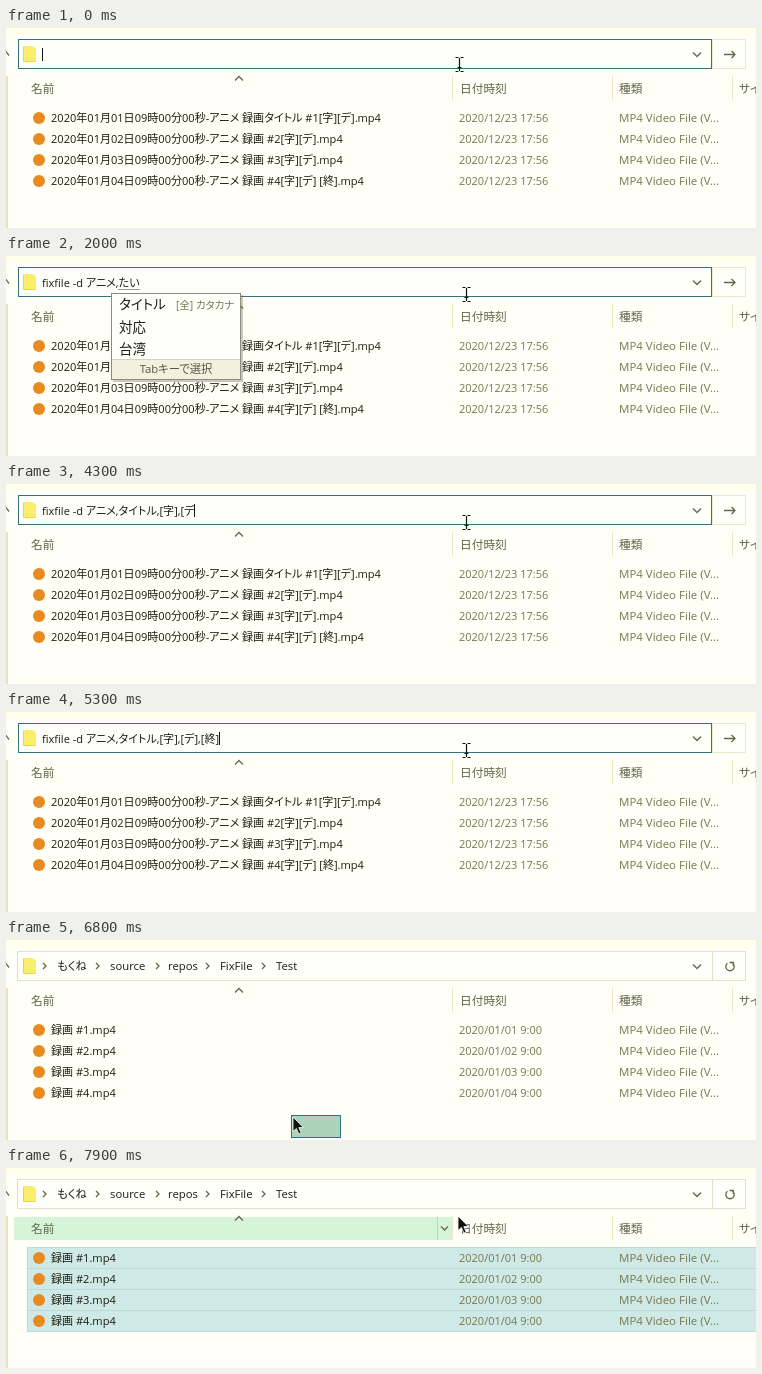
Animation, 750 px wide and 200 px high, one loop 8 s. Source, as an HTML page:

```html
<!DOCTYPE html>
<html lang="ja">
<head>
<meta charset="utf-8">
<title>Batch rename from the address bar</title>
<style>
html, body { margin: 0; width: 100%; height: 100%; overflow: hidden; background: #fffff7; }
svg { display: block; width: 750px; height: 200px; }
text {
  font: 11.3px "Open Sans", "Noto Sans CJK JP", "Noto Sans CJK", sans-serif;
  font-feature-settings: "palt";
  white-space: pre;
  fill: #1c1c10;
}
.dim { fill: #77774f; }
.date { font-size: 11px; }
.kind { font-size: 11.5px; }
.name, .cmd { font-size: 11.05px; }
.head { font-size: 11.7px; fill: #5d6648; }
.cand { font-size: 13.5px; }
.note { font-size: 10.4px; }
.line { fill: none; stroke: #66664c; stroke-width: 1.3; }
.rule { fill: none; stroke: #e8e8c4; }
</style>
</head>
<body>
<svg id="stage" viewBox="0 0 750 200">
  <rect width="750" height="200" fill="#fffff7"/>
  <rect width="750" height="6" fill="#ffffea"/>
  <rect y="48" width="2" height="152" fill="#e6e3b8"/>
  <path class="line" d="M-3 27.5L0 23.5L3 27.5"/>

  <g id="header">
    <g id="hover">
      <rect x="8" y="49" width="439" height="23" fill="#d6f4d8"/>
      <path d="M431.5 49V72" stroke="#b4dcbc"/>
      <path class="line" d="M435 58.5L438.5 62L442 58.5"/>
    </g>
    <path class="rule" d="M446.5 48V72M606.5 48V72M726.5 48V72"/>
    <path class="line" d="M229 52.5L233 48.5L237 52.5"/>
  </g>
  <g id="rows"></g>

  <g id="crumbs">
    <rect x="11.5" y="11.5" width="728" height="29" fill="#fffffa" stroke="#e0e0cc"/>
    <path d="M706.5 12V40" stroke="#e0e0cc"/>
    <path class="line" d="M687 24.5L691 28.5L695 24.5" stroke-width="1.5"/>
    <path class="line" d="M721.5 23.2A4.2 4.2 0 1 0 726.5 23.2M723.5 22.5H727.3V26"/>
  </g>
  <g id="editor">
    <rect x="706.5" y="11.5" width="33" height="29" fill="#fffffa" stroke="#e8e8cc"/>
    <path class="line" d="M718 26.5H729M725.5 23L729 26.5L725.5 30"/>
    <rect x="12.5" y="11.5" width="693" height="29" fill="#fffffa" stroke="#34717a"/>
    <path class="line" d="M687 24.5L691 28.5L695 24.5"/>
    <text id="cmd" class="cmd" x="36" y="31"></text>
    <path id="under" stroke="#333" stroke-dasharray="1 1"/>
    <path id="caret" stroke="#111"/>
  </g>
  <path d="M17 18H26L30 20V34H17Z" fill="#faee6c"/>
  <path d="M17.5 19V33.5H29.5" fill="none" stroke="#e6d648"/>

  <g id="suggest">
    <rect x="39" y="38" width="638" height="54" fill="#55554a" opacity=".3"/>
    <rect x="38" y="37" width="637" height="54" fill="#55554a" opacity=".5"/>
    <rect x="36.5" y="34.5" width="636" height="54" fill="#fffffa" stroke="#5c5c4c"/>
    <text x="42" y="48">fixfile</text>
    <text id="search" x="42" y="67"></text>
    <path d="M669 80V87M666 83V87M663 86V87" stroke="#999988" stroke-width="1.5" stroke-dasharray="1.5 1.5"/>
  </g>

  <g id="ime">
    <rect x="107" y="39" width="130" height="87" fill="#66665a" opacity=".35"/>
    <rect x="105.5" y="37.5" width="129" height="86" fill="#fffffa" stroke="#8c8c7c"/>
    <rect x="106" y="103" width="128" height="20" fill="#f1f1de"/>
    <path d="M106 103.5H234" stroke="#d2d2c0"/>
    <text class="cand" x="113" y="53">タイトル</text>
    <text class="dim note" x="170" y="52.5">[全] カタカナ</text>
    <text class="cand" x="113" y="76">対応</text>
    <text class="cand" x="113" y="97.5">台湾</text>
    <text x="170" y="117" text-anchor="middle" style="fill:#55554a">Tabキーで選択</text>
  </g>

  <rect id="band" fill="#8fc4a4" fill-opacity=".75" stroke="#2f7486"/>
  <path id="beam" d="M-4 -6.5H-1M1 -6.5H4M-4 7.5H-1M1 7.5H4M-2 3.5H2M0 -6V7" fill="none" stroke="#111" stroke-width="1.2"/>
  <path id="arrow" d="M0 0V14.5L3.4 11.4L5.8 17L8.2 16L5.8 10.6H10.4Z" fill="#111" stroke="#fffffb" stroke-width=".8"/>
</svg>
<script>
const LOOP = 8000, STEP = 100;
const ENTER = 5500, RENAME = 5900, DRAG = 6500, DROP = 7400, HOVER = 7700;
const $ = id => document.getElementById(id);

function add(parent, tag, attrs, content = '') {
  const el = document.createElementNS('http://www.w3.org/2000/svg', tag);
  for (const key in attrs) el.setAttribute(key, attrs[key]);
  el.textContent = content;
  return parent.appendChild(el);
}
const label = (parent, x, y, content, cls = '') => add(parent, 'text', { x, y, class: cls }, content);
const show = (id, on) => $(id).setAttribute('visibility', on ? 'visible' : 'hidden');

[[25, '名前'], [454, '日付時刻'], [613, '種類'], [733, 'サイズ']]
  .forEach(([x, title]) => label($('header'), x, 64.5, title, 'head'));

[[51, 'もくね'], [104, 'source'], [162, 'repos'], [214, 'FixFile'], [270, 'Test']]
  .forEach(([x, name]) => label($('crumbs'), x, 30, name));
[39, 92, 152, 202, 258].forEach(x =>
  add($('crumbs'), 'path', { class: 'line', d: `M${x - 2} 23L${x + 1} 26L${x - 2} 29` }));

const rows = [1, 2, 3, 4].map(n => {
  const y = 69 + 21 * n, g = $('rows');
  const mark = add(g, 'rect', { x: 21.5, y: y - 10.5, width: 740, height: 21, fill: '#cfeae6', stroke: '#b8dcd8' });
  add(g, 'circle', { cx: 33, cy: y, r: 6, fill: '#e88a20' });
  const name = label(g, 45, y + 4, '', 'name');
  const date = label(g, 453, y + 4, '', 'dim date');
  label(g, 613, y + 4, 'MP4 Video File (V...', 'dim kind');
  const title = n === 1 ? 'タイトル' : '', last = n === 4 ? ' [終]' : '';
  return {
    y, mark, name, date,
    before: [`2020年01月0${n}日09時00分00秒-アニメ 録画${title} #${n}[字][デ]${last}.mp4`, '2020/12/23 17:56'],
    after: [`録画 #${n}.mp4`, `2020/01/0${n} 9:00`]
  };
});

// [start, committed text, text still being composed]
const typing = [[0, '', '']];
let typed = '';
function compose(...stages) {
  for (const [at, text] of stages) typing.push([at, typed, text]);
}
function commit(at, text) {
  typed += text;
  typing.push([at, typed, '']);
}
[...'fixfile -d '].forEach((c, i) => commit(100 + 100 * i, c));
compose([1200, 'あ'], [1300, 'あに'], [1400, 'あにめ'], [1500, 'アニメ']);
commit(1600, 'アニメ');
commit(1700, ',');
compose([1800, 't'], [1900, 'た'], [2000, 'たい'], [2300, 'タイトル']);
commit(2500, 'タイトル');
commit(2700, ',');
commit(2900, '[');
compose([3000, 'じ'], [3100, '字']);
commit(3200, '字');
commit(3300, ']');
commit(3700, ',');
commit(3900, '[');
compose([4000, 'で'], [4200, 'デ']);
commit(4300, 'デ');
commit(4400, ']');
commit(4600, ',');
commit(4700, '[');
compose([4800, 'しゅう'], [5000, '終']);
commit(5100, '終');
commit(5200, ']');

// [time, x, y]
const pointer = [
  [0, 453, 36], [100, 453, 36], [1500, 460, 38], [5700, 460, 38], [6400, 335, 198],
  [6500, 335, 198], [6800, 287, 177], [7200, 215, 84], [7400, 212, 82], [7900, 452, 48], [8000, 452, 48]
];
function pointerAt(t) {
  const i = pointer.findIndex(p => p[0] > t);
  const [t0, x0, y0] = pointer[i - 1], [t1, x1, y1] = pointer[i];
  const u = (t - t0) / (t1 - t0), k = u * u * (3 - 2 * u);
  return [x0 + (x1 - x0) * k, y0 + (y1 - y0) * k].map(Math.round);
}

function drawEditor(t) {
  const editing = t < ENTER;
  const [, done, pending] = typing.filter(s => s[0] <= t).pop();
  const cmd = $('cmd');
  const endOf = text => {
    cmd.textContent = text;
    return 36 + (text ? cmd.getComputedTextLength() : 0);
  };
  const from = endOf(done), to = endOf(done + pending);
  $('under').setAttribute('d', `M${from} 33.5H${to}`);
  $('caret').setAttribute('d', `M${Math.round(to) + .5} 20V33`);
  show('editor', editing);
  show('crumbs', !editing);
  show('under', editing && pending);
  show('caret', editing && !pending);
  $('search').textContent = `"${done.trim()}" の検索`;
  show('suggest', t >= 300 && t < 1200);
  show('ime', t >= 1900 && t < 2500);
}

function drawPointer(t) {
  const [x, y] = pointerAt(t);
  const hidden = t >= 100 && t < 1500, inBar = t <= 5700;
  $('beam').setAttribute('transform', `translate(${x + .5} ${y})`);
  $('arrow').setAttribute('transform', `translate(${x} ${y})`);
  show('beam', inBar && !hidden);
  show('arrow', !inBar);
  const left = x - 1.5, top = y - 1.5;
  const box = { x: left, y: top, width: Math.max(0, 334.5 - left), height: Math.max(0, 197.5 - top) };
  for (const key in box) $('band').setAttribute(key, box[key]);
  show('band', t > DRAG && t < DROP);
  return y;
}

function drawRows(t, pointerY) {
  for (const r of rows) {
    [r.name.textContent, r.date.textContent] = t < RENAME ? r.before : r.after;
    const selected = t >= DROP || (t > DRAG && pointerY < r.y + 10);
    r.mark.setAttribute('visibility', selected ? 'visible' : 'hidden');
  }
  show('hover', t >= HOVER);
}

function frame() {
  const t = Math.floor(performance.now() % LOOP / STEP) * STEP;
  drawEditor(t);
  drawRows(t, drawPointer(t));
  requestAnimationFrame(frame);
}
frame();
</script>
</body>
</html>
```
